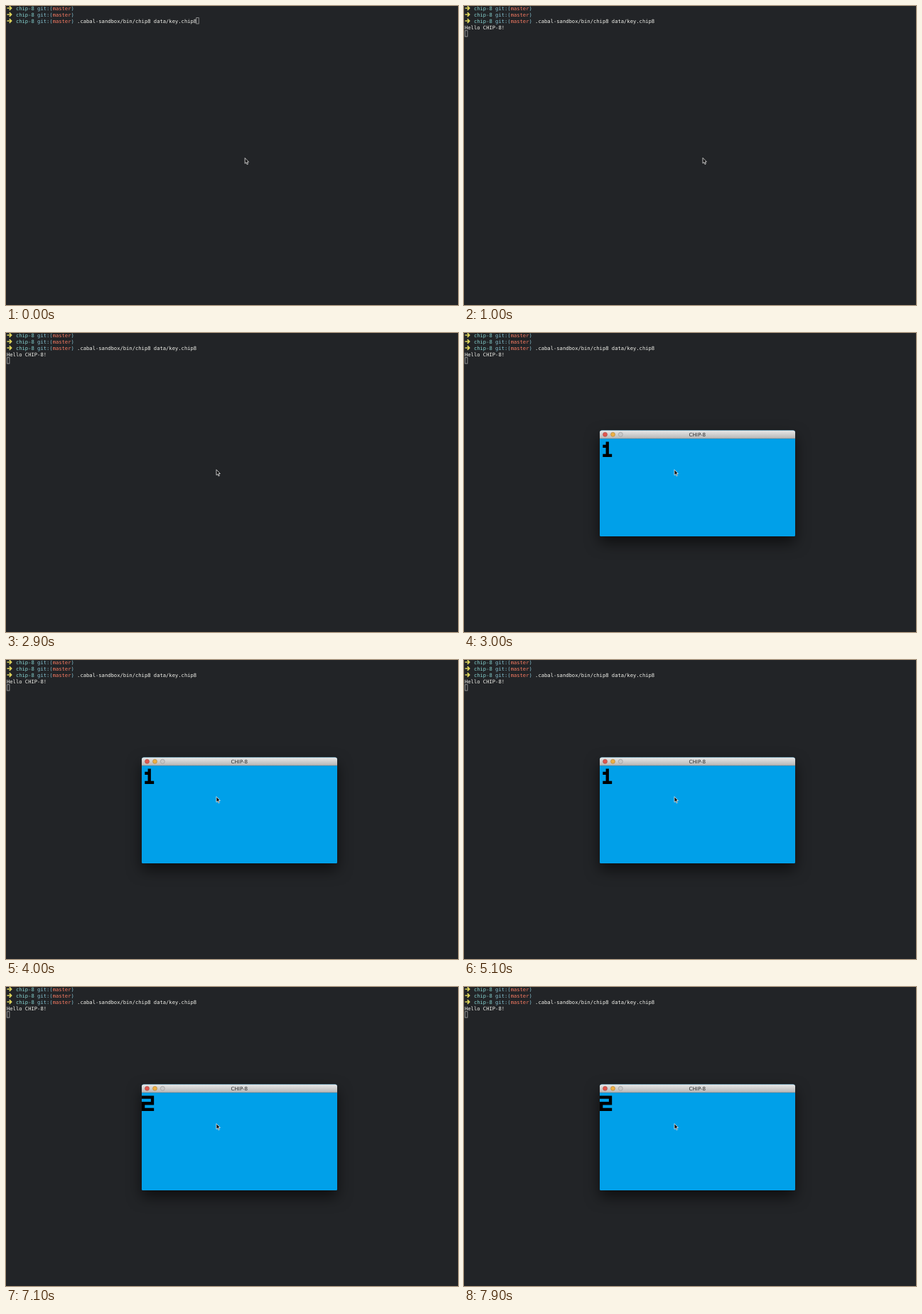
An HTML page that plays this animation: 636 px wide and 422 px high, repeating every 8000 ms.

```html
<!DOCTYPE html>
<html lang="en">
<head>
<meta charset="utf-8">
<title>CHIP-8</title>
<style>
  html, body { margin: 0; width: 100%; height: 100%; overflow: hidden; background: #222427; }
  svg { display: block; width: 636px; height: 422px; }
  text { white-space: pre; text-rendering: geometricPrecision; }
  .term { font: 7.16px "DejaVu Sans Mono", monospace; fill: #f2f2ec; }
  .arrow { fill: none; stroke: #dfd65c; stroke-width: 1.7; }
  .dir { fill: #86d3d0; }
  .git { fill: #86c3d2; }
  .branch { fill: #f67a62; }
  .caret { fill: none; stroke: #a4a5a4; stroke-width: .8; }
  .title { font: 7.15px "DejaVu Sans", sans-serif; fill: #2c2c2c; text-anchor: middle; }
  #window { filter: drop-shadow(0 9px 10px rgba(0, 0, 0, .6)); }
</style>
</head>
<body>
<svg viewBox="0 0 636 422">
  <defs>
    <linearGradient id="bar" x2="0" y2="1">
      <stop offset="0" stop-color="#e9e9e9"/>
      <stop offset="1" stop-color="#b6b6b6"/>
    </linearGradient>
  </defs>
  <rect width="636" height="422" fill="#222427"/>
  <g class="term" id="prompts"></g>
  <text class="term" id="hello" x="1" y="32.600">Hello CHIP-8!</text>
  <rect class="caret" id="caret" width="3.4" height="8.4"/>
  <g id="window">
    <path d="M191 285.500V140.500q0-3 3-3H463q3 0 3 3V285.500q0 1.500-1.500 1.500H192.500q-1.500 0-1.500-1.500z" fill="#00a0e9"/>
    <path d="M191 149V140.500q0-3 3-3H463q3 0 3 3V149z" fill="url(#bar)"/>
    <path d="M191 149H466" stroke="#777" stroke-width=".6"/>
    <g stroke-width=".6">
      <circle cx="198.500" cy="143.200" r="3" fill="#e2574e" stroke="#a04540"/>
      <circle cx="209.500" cy="143.200" r="3" fill="#eeb044" stroke="#a98139"/>
      <circle cx="220.300" cy="143.200" r="3" fill="#c9c9c9" stroke="#949494"/>
    </g>
    <text class="title" x="328.300" y="145.900">CHIP-8</text>
    <path id="digit" fill="#000"/>
  </g>
  <path id="mouse" d="M0 0V7.800L1.800 6.200L3 9.200L4.300 8.600L3.100 5.700H5.400z"
        fill="#0c0c0c" stroke="#f4f4f4" stroke-width=".75" stroke-linejoin="round"/>
</svg>
<script>
const LOOP = 8000;
const $ = id => document.getElementById(id);

// CHIP-8 font rows, four bits each
const GLYPHS = { 1: [2, 6, 2, 2, 7], 2: [15, 1, 15, 8, 15] };
const PIXEL = 275 / 64;

// [time, x, y]
const MOUSE = [
  [0, 336.2, 214.5], [400, 336, 214.3], [1400, 336, 214.3],
  [1700, 325.5, 213], [2000, 309, 209], [2300, 297, 195.6], [2400, 296, 192.8]
];

const prompt = (y, command) =>
  `<path class="arrow" d="M1.500 ${y - 2.6}H7.500M4.800 ${y - 5.4}L7.600 ${y - 2.6}L4.800 ${y + .2}"/>` +
  `<text x="13.930" y="${y}"><tspan class="dir">chip-8 </tspan><tspan class="git">git:(</tspan>` +
  `<tspan class="branch">master</tspan><tspan class="git">)</tspan> ${command}</text>`;

$("prompts").innerHTML = prompt(5.6, "") + prompt(14.6, "") +
  prompt(23.6, ".cabal-sandbox/bin/chip8 data/key.chip8");

function glyphPath(rows) {
  let d = "";
  rows.forEach((bits, row) => {
    for (let col = 0; col < 4; col++) {
      if (bits & (8 >> col)) {
        d += `M${191 + col * PIXEL} ${149.2 + (row + 1) * PIXEL}h${PIXEL}v${PIXEL}h${-PIXEL}z`;
      }
    }
  });
  return d;
}

const PATHS = { 1: glyphPath(GLYPHS[1]), 2: glyphPath(GLYPHS[2]) };

function mouseAt(t) {
  const i = MOUSE.findIndex(step => step[0] > t);
  if (i < 0) return MOUSE[MOUSE.length - 1].slice(1);
  const [t0, x0, y0] = MOUSE[i - 1];
  const [t1, x1, y1] = MOUSE[i];
  const k = (t - t0) / (t1 - t0);
  return [x0 + (x1 - x0) * k, y0 + (y1 - y0) * k];
}

function show(id, on) {
  $(id).style.display = on ? "" : "none";
}

function draw(now) {
  const t = Math.floor((now % LOOP) / 100) * 100;
  const caret = t < 900 ? [267.8, 16.6] : t < 1000 ? [1.5, 25.6] : [1.5, 34.7];
  $("caret").setAttribute("x", caret[0]);
  $("caret").setAttribute("y", caret[1]);
  show("hello", t >= 1000);
  show("window", t >= 3000);
  $("digit").setAttribute("d", PATHS[t < 5400 ? 1 : 2]);
  $("mouse").setAttribute("transform", `translate(${mouseAt(t)})`);
}

function tick() {
  draw(performance.now());
  requestAnimationFrame(tick);
}
tick();
</script>
</body>
</html>
```
